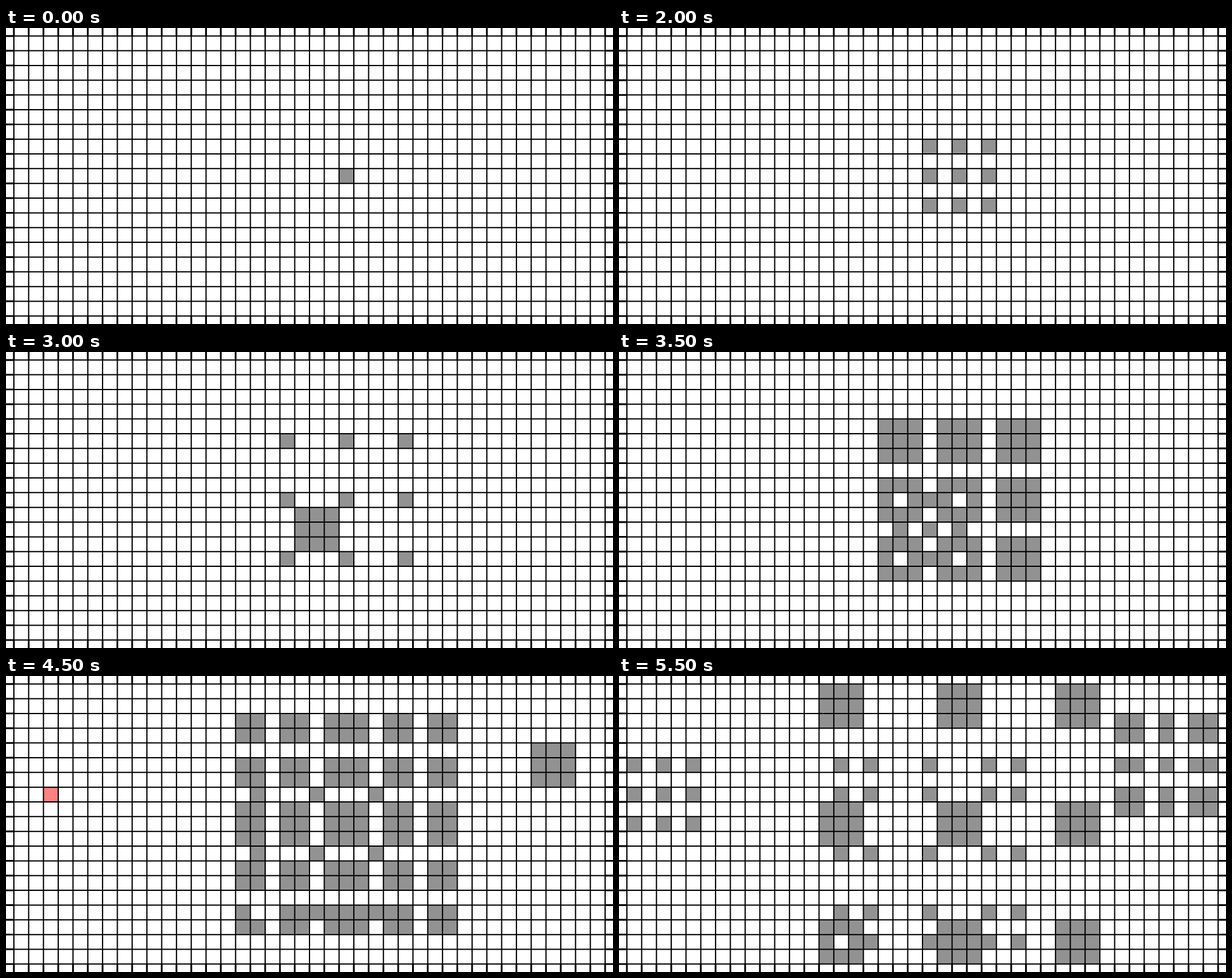
An HTML page with a canvas for the animation above (7000 ms loop, 1000 by 489 pixels).

```html
<!DOCTYPE html>
<html lang="en">
<head>
<meta charset="utf-8">
<title>Parity replicator</title>
<style>
  html, body { margin: 0; width: 100%; height: 100%; overflow: hidden; background: #fff; }
  canvas { display: block; }
</style>
</head>
<body>
<canvas id="stage" width="1000" height="489"></canvas>
<script>
const ctx = document.getElementById('stage').getContext('2d');
const WIDTH = 1000, HEIGHT = 489, COLS = 40, ROWS = 19, PITCH = 24.35;
const LEFT = (WIDTH - COLS * PITCH) / 2, TOP = (HEIGHT - ROWS * PITCH) / 2;
const LOOP = 7000, FIRST_HOLD = 1500, STEP = 500, LAST = 9;
const ALIVE = '#929292', ADDED = '#ff8080', REMOVED = '#80ff80';

// Cells flipped by hand, by generation
const flips = { 3: [20, 11], 6: [36, 5], 7: [2, 7] };

const xAt = col => LEFT + col * PITCH;
const yAt = row => TOP + row * PITCH;
const makeGrid = rule => Array.from({ length: ROWS }, (_, row) =>
  Array.from({ length: COLS }, (_, col) => rule(col, row)));

// A cell lives when an odd number of cells in its 3 by 3 block were alive
function nextGeneration(cells) {
  return makeGrid((col, row) => {
    let parity = 0;
    for (let dy = -1; dy <= 1; dy++)
      for (let dx = -1; dx <= 1; dx++)
        parity ^= cells[row + dy]?.[col + dx] ?? 0;
    return parity;
  });
}

const generations = [makeGrid((col, row) => +(col === 22 && row === 9))];
for (let n = 1; n <= LAST; n++) {
  const cells = nextGeneration(generations[n - 1]);
  if (flips[n]) {
    const [col, row] = flips[n];
    cells[row][col] ^= 1;
  }
  generations.push(cells);
}

function fillCell(col, row, color) {
  ctx.fillStyle = color;
  ctx.fillRect(xAt(col), yAt(row), PITCH, PITCH);
}

function drawLines(x0, y0, x1, y1, width) {
  ctx.lineWidth = width;
  ctx.beginPath();
  for (let col = 0; col <= COLS; col++) {
    ctx.moveTo(xAt(col), y0);
    ctx.lineTo(xAt(col), y1);
  }
  for (let row = 0; row <= ROWS; row++) {
    ctx.moveTo(x0, yAt(row));
    ctx.lineTo(x1, yAt(row));
  }
  ctx.stroke();
}

function drawGrid() {
  const right = xAt(COLS), bottom = yAt(ROWS);
  ctx.strokeStyle = '#000';
  drawLines(LEFT, TOP, right, bottom, 2);
  // Heavier ticks run from the grid to the stage edges
  drawLines(0, 0, LEFT, TOP, 2.9);
  drawLines(right, bottom, WIDTH, HEIGHT, 2.9);
}

function draw(n) {
  ctx.fillStyle = '#fff';
  ctx.fillRect(0, 0, WIDTH, HEIGHT);
  const cells = generations[n];
  cells.forEach((line, row) => line.forEach((alive, col) => {
    if (alive) fillCell(col, row, ALIVE);
  }));
  if (flips[n]) {
    const [col, row] = flips[n];
    fillCell(col, row, cells[row][col] ? ADDED : REMOVED);
  }
  drawGrid();
}

function tick() {
  const time = performance.now() % LOOP;
  const n = Math.floor((time - FIRST_HOLD) / STEP) + 1;
  draw(Math.max(0, Math.min(LAST, n)));
  requestAnimationFrame(tick);
}
tick();
</script>
</body>
</html>
```
